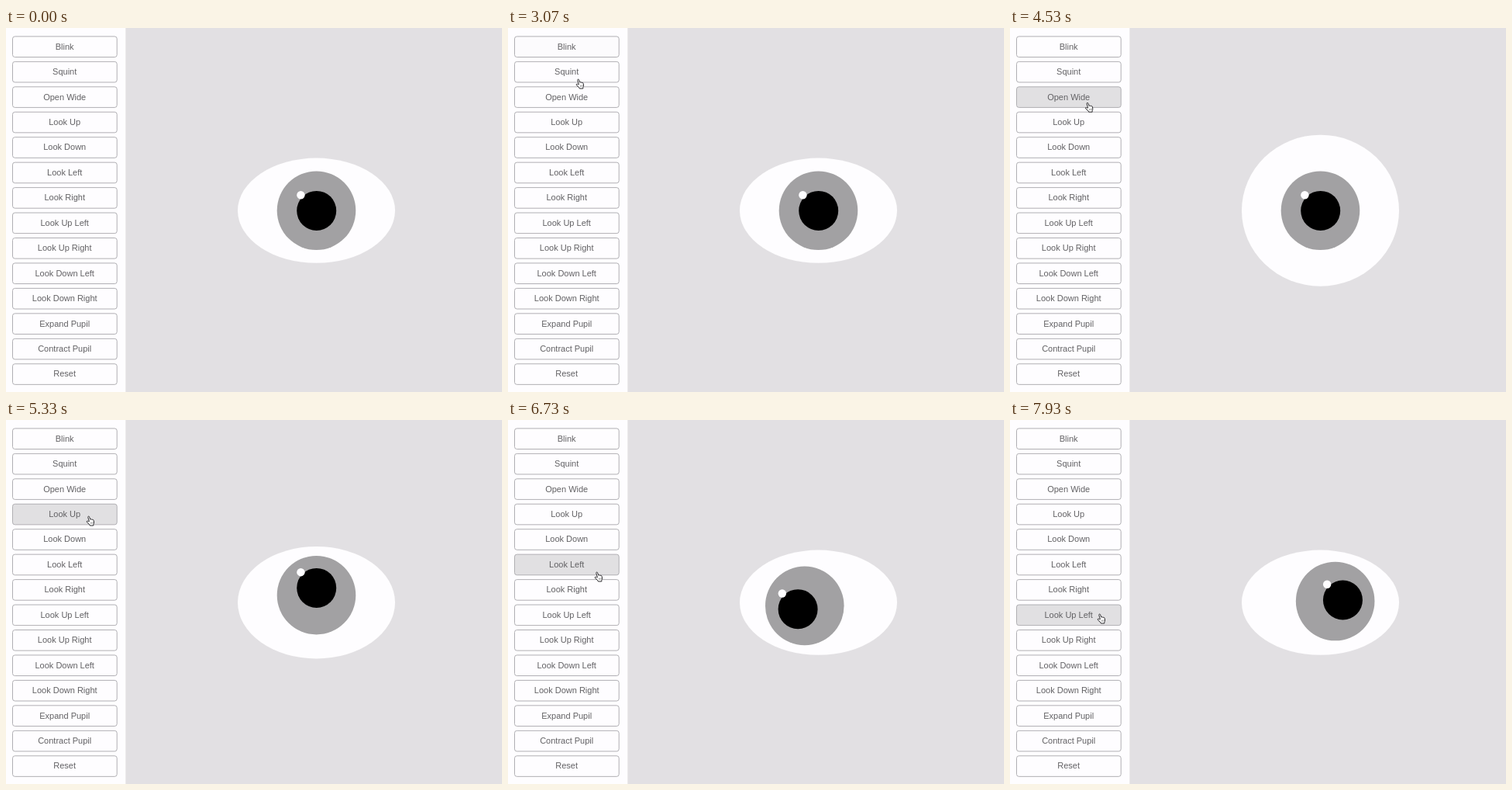
These frames come from a looping animation (640x469 px, 8 s). An HTML page:

```html
<!DOCTYPE html>
<html lang="en">
<head>
<meta charset="utf-8">
<title>Eye controls</title>
<style>
  html, body { margin: 0; width: 100%; height: 100%; overflow: hidden; background: #e2e0e3; }
  svg { display: block; width: 100%; height: 100%; }
  text { font: 11px "Liberation Sans", Arial, sans-serif; fill: #626164; text-anchor: middle; }
</style>
</head>
<body>
<svg viewBox="0 0 640 469">
  <defs>
    <clipPath id="lids"><ellipse id="lidClip" cx="400.5" cy="235.2" rx="101.5" ry="67.6"/></clipPath>
  </defs>
  <rect width="640" height="469" fill="#e2e0e3"/>
  <rect width="154.3" height="469" fill="#fefdff"/>
  <g id="buttons"></g>
  <ellipse id="white" cx="400.5" cy="235.2" rx="101.5" ry="67.6" fill="#fefdff"/>
  <g clip-path="url(#lids)">
    <circle id="iris" cx="400.5" cy="235.2" r="50.8" fill="#a2a1a3"/>
    <g id="pupil">
      <circle cx="400.7" cy="235.4" r="25.5"/>
      <circle cx="380.4" cy="215.2" r="5.2" fill="#fefdff"/>
    </g>
  </g>
  <g id="cursor" stroke-linejoin="round">
    <path id="arrow" d="M.5 .5V11L3 8.7L4.7 12.4L6.4 11.6L4.8 8H8Z" fill="#111" stroke="#fff" stroke-width=".8"/>
    <g id="hand" transform="translate(-.5 -.5)">
      <path d="M3.9 7.2L2.3 2.1Q2 .8 3 .6Q3.8 .5 4.2 1.6L5.2 4.6Q6 3.9 6.7 4.7Q7.7 4.1 8.3 5Q9.4 4.7 9.7 6.1L10 8.6Q9.9 10.2 9.3 11V12.5H4.8L4.4 11.3L1 8.3Q.2 7.2 1.1 6.7Q1.8 6.4 2.8 7.3Z" fill="#fff" stroke="#2b2a2d"/>
      <path d="M5.9 8.2V10.3M7.3 8.1V10.2M8.6 8V10" fill="none" stroke="#555" stroke-width=".55"/>
    </g>
  </g>
</svg>
<script>
const LOOP = 8000;
const $ = id => document.getElementById(id);
const labels = ["Blink", "Squint", "Open Wide", "Look Up", "Look Down", "Look Left", "Look Right",
  "Look Up Left", "Look Up Right", "Look Down Left", "Look Down Right",
  "Expand Pupil", "Contract Pupil", "Reset"];
const TOP = 10.9, STEP = 32.45, HEIGHT = 26.6;

// the buttons are clicked one after another, from the first one down
const clicks = [2490, 3440, 4225, 5090, 5890, 6513, 7235, 7897];
const restY = [27, 66, 95, 124, 157, 196, 228, 250];
const restX = i => 113 - 36 * Math.pow(Math.max(0, 1 - i / 6), 2);

const clamp = v => Math.max(0, Math.min(1, v));
const mix = (a, b, p) => a + (b - a) * p;
const easeOut = power => p => 1 - Math.pow(1 - p, power);
const smooth = p => p * p * (3 - 2 * p);

// moves: { at, dur, to }, each one leading on from the one before
function follow(moves, t, from, ease) {
  return moves.reduce((now, { at, dur, to }) => {
    const p = ease(clamp((t - at) / dur));
    return now.map((v, k) => mix(v, to[k], p));
  }, from);
}

const lids = [{ at: clicks[0], dur: 180, to: [0.02] }];
const gaze = [];
const pointer = [
  { at: 70, dur: 330, to: [150, 177] },
  { at: 610, dur: 790, to: [67, 34] },
  { at: 2130, dur: 200, to: [restX(0), restY[0]] }
];

clicks.forEach((at, i) => {
  const has = word => labels[i].includes(word);
  const open = has("Squint") ? 0.5 : has("Wide") ? 1.5 : 1;
  lids.push({ at: has("Blink") ? at + 180 : at, dur: has("Blink") ? 300 : 500, to: [open] });
  gaze.push({ at, dur: 500, to: [has("Right") - has("Left"), has("Down") - has("Up")] });
  if (i) pointer.push({ at: clicks[i - 1] + 270, dur: 290, to: [restX(i), restY[i]] });
});

function make(tag, attrs) {
  const el = document.createElementNS("http://www.w3.org/2000/svg", tag);
  for (const k in attrs) el.setAttribute(k, attrs[k]);
  return $("buttons").appendChild(el);
}

const faces = labels.map((label, i) => {
  const y = TOP + i * STEP;
  const face = make("rect", { x: 8.5, y, width: 134.7, height: HEIGHT, rx: 3, stroke: "#b0afb3", fill: "#fefdff" });
  make("text", { x: 75.7, y: y + 16.7 }).textContent = label;
  return face;
});

function overButton(x, y) {
  const row = (y - TOP) / STEP;
  return x > 8 && x < 144 && row >= 0 && row < labels.length && row % 1 < HEIGHT / STEP;
}

function draw(t) {
  const [open] = follow(lids, t, [1], easeOut(3));
  const [gx, gy] = follow(gaze, t, [0, 0], easeOut(2));
  $("white").setAttribute("ry", 67.6 * open);
  $("lidClip").setAttribute("ry", 67.6 * open);
  $("iris").setAttribute("transform", `translate(${26 * gx} ${13 * gy})`);
  $("pupil").setAttribute("transform", `translate(${39 * gx} ${26 * gy})`);

  clicks.forEach((c, i) => {
    const press = smooth(clamp((t - c + 230) / 180)) * (1 - smooth(clamp((t - c - 300) / 330)));
    const shade = Math.round(mix(254, 225, press));
    faces[i].setAttribute("fill", `rgb(${shade}, ${shade - 1}, ${shade + 1})`);
  });

  const [x, y] = follow(pointer, t, [309, 440], smooth);
  const hand = overButton(x + 3, y + 1);
  $("cursor").setAttribute("transform", `translate(${x} ${y})`);
  $("cursor").style.display = t < 70 ? "none" : "";
  $("hand").style.display = hand ? "" : "none";
  $("arrow").style.display = hand ? "none" : "";
}

const begin = performance.now();
function tick() {
  draw((performance.now() - begin) % LOOP);
  requestAnimationFrame(tick);
}
draw(0);
requestAnimationFrame(tick);
</script>
</body>
</html>
```
